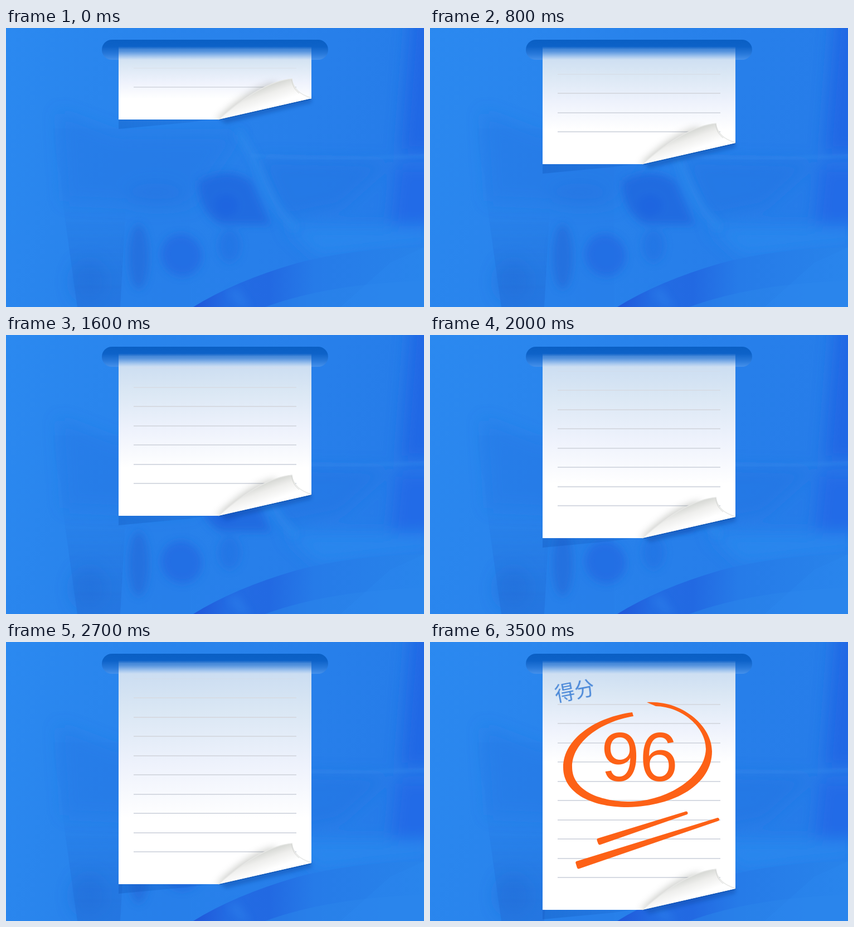
Animation of 750 by 500 pixels, one loop 3600 ms. Source, as an HTML page:

```html
<!DOCTYPE html>
<html lang="zh">
<head>
<meta charset="utf-8">
<title>得分</title>
<style>
html, body { margin: 0; width: 100%; height: 100%; overflow: hidden; background: #2882eb; }
svg { display: block; width: 750px; height: 500px; }
.paper { animation: feed 3.6s infinite; }
.shade { transform-origin: 0 40px; animation: shade 3.6s infinite; }
.mark { animation: mark 3.6s infinite; }
/* the sheet feeds 10px every 100ms, then settles */
@keyframes feed {
  0% { transform: translateY(0); animation-timing-function: steps(31, end); }
  86.111% { transform: translateY(310px); animation-timing-function: steps(1, end); }
  88.888%, 100% { transform: translateY(316px); }
}
@keyframes shade {
  0% { transform: scaleY(.868); animation-timing-function: steps(31, end); }
  86.111% { transform: scaleY(3.038); animation-timing-function: steps(4, end); }
  97.222%, 100% { transform: scaleY(1.75); }
}
@keyframes mark {
  0% { opacity: 0; animation-timing-function: steps(1, end); }
  86.111% { opacity: 0; animation-timing-function: steps(4, end); }
  97.222%, 100% { opacity: 1; }
}
</style>
</head>
<body>
<svg viewBox="0 0 750 500">
  <defs>
    <linearGradient id="base" x2="1" y2=".25">
      <stop offset="0" stop-color="#2b89f0"/>
      <stop offset=".5" stop-color="#2882eb"/>
      <stop offset="1" stop-color="#267ce9"/>
    </linearGradient>
    <linearGradient id="arc" gradientUnits="userSpaceOnUse" x1="340" y1="0" x2="750" y2="0">
      <stop offset="0" stop-color="#2058da"/>
      <stop offset=".14" stop-color="#236ce3"/>
      <stop offset=".32" stop-color="#2269e2"/>
      <stop offset=".52" stop-color="#267be8"/>
      <stop offset="1" stop-color="#2883ea"/>
    </linearGradient>
    <linearGradient id="wing" gradientUnits="userSpaceOnUse" x1="0" y1="320" x2="0" y2="480">
      <stop offset="0" stop-color="#2270da" stop-opacity="0"/>
      <stop offset="1" stop-color="#2270da" stop-opacity=".65"/>
    </linearGradient>
    <linearGradient id="slot" x2="0" y2="1">
      <stop offset="0" stop-color="#0a5fc4"/>
      <stop offset=".35" stop-color="#0d62c8"/>
      <stop offset=".7" stop-color="#2778da"/>
      <stop offset="1" stop-color="#4590ea"/>
    </linearGradient>
    <linearGradient id="tint" x2="0" y2="1">
      <stop offset="0" stop-color="#c8dbf1"/>
      <stop offset=".3" stop-color="#dae7f4"/>
      <stop offset=".65" stop-color="#eef2fc"/>
      <stop offset="1" stop-color="#fff"/>
    </linearGradient>
    <linearGradient id="flap" gradientUnits="userSpaceOnUse" x1="462" y1="104" x2="474" y2="138">
      <stop offset="0" stop-color="#d3d5d1"/>
      <stop offset=".45" stop-color="#eeeeec"/>
      <stop offset="1" stop-color="#fff"/>
    </linearGradient>
    <linearGradient id="drop" gradientUnits="userSpaceOnUse" x1="202" y1="0" x2="370" y2="0">
      <stop offset="0" stop-color="#0d50b4" stop-opacity=".3"/>
      <stop offset="1" stop-color="#0d50b4" stop-opacity=".12"/>
    </linearGradient>
    <linearGradient id="in" gradientUnits="userSpaceOnUse" x1="0" y1="33" x2="0" y2="57">
      <stop offset="0" stop-color="#fff" stop-opacity="0"/>
      <stop offset=".5" stop-color="#fff" stop-opacity=".45"/>
      <stop offset="1" stop-color="#fff"/>
    </linearGradient>
    <linearGradient id="ruleIn" gradientUnits="userSpaceOnUse" x1="0" y1="60" x2="0" y2="112">
      <stop offset="0" stop-color="#fff" stop-opacity=".15"/>
      <stop offset="1" stop-color="#fff"/>
    </linearGradient>
    <mask id="mouth" maskUnits="userSpaceOnUse" x="0" y="0" width="750" height="500">
      <path fill="url(#in)" d="M0 33H750V500H0Z"/>
    </mask>
    <mask id="ruleMask" maskUnits="userSpaceOnUse" x="0" y="0" width="750" height="500">
      <path fill="url(#ruleIn)" d="M0 57H750V500H0Z"/>
    </mask>
    <clipPath id="sheet"><path d="M202 -320H548V126L381 164H202Z"/></clipPath>
    <filter id="b3" x="-50%" y="-50%" width="200%" height="200%"><feGaussianBlur stdDeviation="3"/></filter>
    <filter id="b7" x="-50%" y="-50%" width="200%" height="200%"><feGaussianBlur stdDeviation="7"/></filter>
    <filter id="b14" x="-60%" y="-60%" width="220%" height="220%"><feGaussianBlur stdDeviation="14"/></filter>
  </defs>

  <!-- backdrop -->
  <rect width="750" height="500" fill="url(#base)"/>
  <g filter="url(#b14)">
    <path fill="#2066e4" opacity=".85" d="M728 -40H800V225H708Z"/>
    <path fill="#2066e6" opacity=".75" d="M700 245H800V355H690Z"/>
    <path fill="#2475e2" opacity=".5" d="M455 235L690 240L600 320L500 340Z"/>
    <path fill="#2578e4" opacity=".45" d="M95 150L200 190L420 190L330 320L105 310Z"/>
    <path fill="#2c8aef" opacity=".7" d="M500 355H760V390L560 410Z"/>
    <ellipse cx="150" cy="455" rx="32" ry="38" fill="#216bd8" opacity=".55"/>
    <ellipse cx="268" cy="300" rx="50" ry="22" fill="#2474e0" opacity=".4"/>
  </g>
  <path fill="url(#wing)" d="M103 320H215L205 500H128Z"/>
  <path fill="#2676e2" opacity=".1" d="M85 180Q86 230 98 262L103 320L128 500H330V180Z"/>
  <g filter="url(#b7)">
    <path fill="#2169df" opacity=".85" d="M345 275Q400 245 440 275L474 352H385Q345 330 345 275Z"/>
    <ellipse cx="395" cy="318" rx="22" ry="20" fill="#2061df" opacity=".6"/>
    <ellipse cx="238" cy="410" rx="18" ry="58" fill="#226cdb" opacity=".7"/>
    <ellipse cx="315" cy="407" rx="36" ry="38" fill="#2169e2" opacity=".75" transform="rotate(-30 315 407)"/>
    <ellipse cx="401" cy="390" rx="20" ry="30" fill="#2370e2" opacity=".55"/>
    <path fill="none" stroke="#328eef" stroke-width="12" opacity=".55" d="M415 185Q440 220 460 270T520 360"/>
  </g>
  <path fill="none" stroke="#3c92ef" stroke-width="5" opacity=".4" filter="url(#b3)" d="M440 228Q560 238 760 229"/>
  <path fill="url(#arc)" d="M336 500Q410 454 520 422Q620 395 750 393V500Z"/>
  <path fill="#2a86ec" opacity=".55" d="M465 500Q580 458 750 453V500Z"/>
  <path fill="#2c88ed" opacity=".3" d="M690 420L750 393V500H600Z"/>
  <path fill="#2f86ee" opacity=".4" filter="url(#b7)" d="M398 475L415 465L440 500H418Z"/>

  <rect x="172" y="21" width="406" height="36" rx="18" fill="url(#slot)"/>

  <g class="paper">
    <path fill="url(#drop)" d="M202 163H372L330 169L202 181Z"/>
    <path fill="#0b469f" opacity=".4" filter="url(#b3)" d="M381 162L548 124V134L395 171Z"/>
    <path fill="#1050a8" opacity=".6" d="M381 164.5L548 126V128L384 165Z"/>
  </g>

  <g mask="url(#mouth)">
    <g class="paper"><path fill="#fff" d="M202 -320H548V126L381 164H202Z"/></g>
    <rect class="shade" x="202" y="40" width="346" height="100" fill="url(#tint)"/>
    <g mask="url(#ruleMask)">
      <g class="paper"><path id="rules" fill="none" stroke="#d6dae2" stroke-width="2"/></g>
    </g>
    <g class="paper">
      <g clip-path="url(#sheet)">
        <path fill="#76786f" opacity=".38" filter="url(#b7)" d="M376 166C412 130 455 100 486 98L480 124L400 166Z"/>
      </g>
      <path fill="url(#flap)" d="M381 164C420 130 470 95 513 91C515 108 526 119 548 126Z"/>
      <path fill="none" stroke="#e6e7e5" stroke-width="1.6" d="M381 164C420 130 470 95 513 91C515 108 526 119 548 125.5"/>
      <path fill="none" stroke="#c9cbc8" stroke-width="1" opacity=".7" d="M512.5 92C514 104 518 111 526 117"/>
    </g>
  </g>

  <g class="mark">
    <text x="259.5" y="101" transform="rotate(-11 259.5 88)" text-anchor="middle" fill="#4a88d8" font-size="36" font-family="'Noto Sans CJK SC', 'Noto Sans CJK', sans-serif">得分</text>
    <g fill="#fd6116">
      <text x="307" y="249" font-size="124" font-family="'Liberation Sans', Arial, sans-serif">96</text>
      <path d="M363 126C300 134 239 172 239 225C239 268 285 296 355 296C440 294 506 255 506 196C506 150 452 104 389 108L405 115C452 116 495 152 495 192C493 243 425 285 360 286C300 286 255 264 255 224C255 180 305 143 365 133Z"/>
      <path stroke="#fd6116" stroke-width="6" stroke-linejoin="round" d="M302.5 354.7L304.5 360.3L459.5 306.5ZM264.3 395.7L266.7 403.3L516 318Z"/>
    </g>
  </g>
</svg>
<script>
const rules = Array.from({ length: 10 }, (_, i) => `M229 ${Math.round(106 - i * 34.5)}H521`);
document.getElementById('rules').setAttribute('d', rules.join(''));
</script>
</body>
</html>
```
